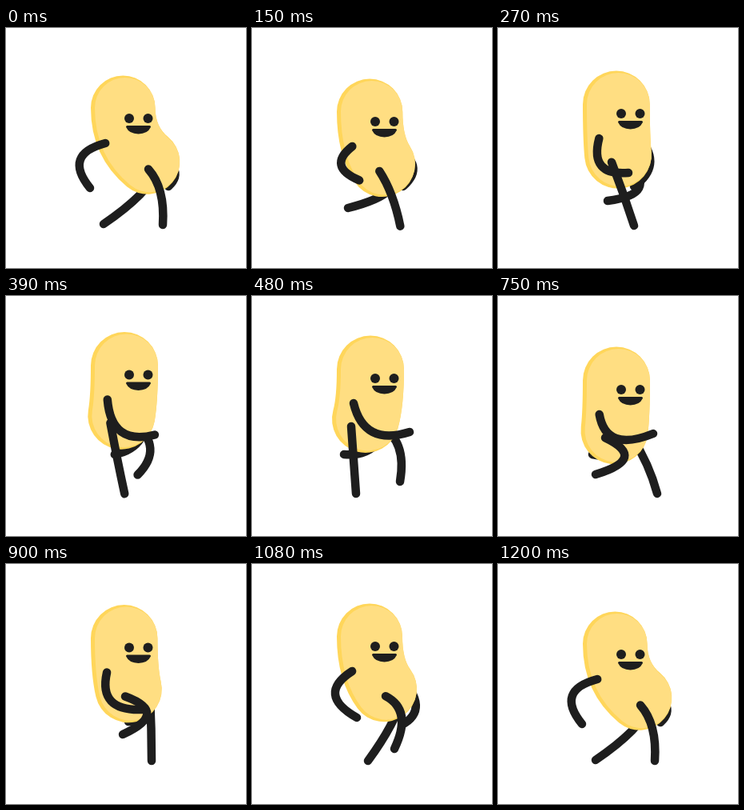
An HTML page with a canvas for the animation above (1.23 s loop, 300 px wide and 300 px high).

```html
<!DOCTYPE html>
<html>
<head>
<meta charset="utf-8">
<style>
html, body { margin: 0; width: 100%; height: 100%; overflow: hidden; background: #fff; }
canvas { display: block; width: 300px; height: 300px; }
</style>
</head>
<body>
<canvas id="stage" width="300" height="300"></canvas>
<script>
const ctx = document.getElementById('stage').getContext('2d');
const LOOP = 1230, STEP = 30, STRIDE = 1200;
const INK = '#1e1e1e', LIGHT = '#ffde82', SHADE = '#ffd65a';

// Each row: time, then the animated values.
const bobKeys = [[0, 113], [100, 118.3], [150, 117], [270, 107], [300, 104.5], [390, 98.5], [480, 103]];
const pelvisKeys = [[0, 177], [270, 150], [480, 142], [600, 141.5], [750, 145.5], [900, 153], [1080, 165]];

// time, hip x, knee x, knee y, foot x, foot y
const frontLegKeys = [
  [0, 178, 199, 200, 196, 246],
  [270, 142, 157, 207, 170, 247],
  [480, 124, 127, 204, 130, 247],
  [600, 122, 116, 209, 108, 245],
  [660, 125, 138, 208, 102, 238],
  [750, 134, 188, 203, 122, 223],
  [900, 149, 205, 186, 146, 213],
  [1080, 167, 201, 183, 178, 231]
];
const backLegKeys = [
  [0, 190, 178, 207, 122, 245],
  [150, 165, 198, 205, 120, 225],
  [270, 162, 203, 208, 137, 216],
  [480, 160, 194, 180, 185, 232],
  [600, 165, 193, 205, 203, 246],
  [750, 168, 189, 210, 199, 247],
  [900, 180, 182, 206, 182, 246],
  [1080, 188, 180, 198, 145, 246]
];

// time, elbow x, elbow y, hand x, hand y
const frontArmKeys = [
  [0, 71, 158, 105, 200],
  [270, 114, 185, 163, 181],
  [480, 140, 188, 197, 170],
  [750, 135, 196, 194, 172],
  [900, 115, 184, 170, 182],
  [1080, 80, 163, 131, 192]
];
const backArmKeys = [
  [0, 228, 176, 203, 198],
  [270, 206, 172, 170, 198],
  [480, 165, 203, 115, 198],
  [750, 165, 208, 118, 198],
  [900, 190, 195, 153, 197],
  [1080, 224, 177, 191, 199]
];

// Periodic cubic interpolation through uneven keys.
function sample(keys, time, period) {
  const n = keys.length;
  const t = time % period;
  const key = (i, c) => keys[(i + n) % n][c] + (c ? 0 : Math.floor(i / n) * period);
  let i = n - 1;
  while (keys[i][0] > t) i--;
  const span = key(i + 1, 0) - key(i, 0);
  const u = (t - key(i, 0)) / span;
  const slope = (j, c) => (key(j + 1, c) - key(j - 1, c)) / (key(j + 1, 0) - key(j - 1, 0));
  return keys[0].slice(1).map((_, k) => {
    const c = k + 1, a = key(i, c), b = key(i + 1, c);
    const ma = slope(i, c) * span, mb = slope(i + 1, c) * span;
    return a + u * (ma + u * (3 * (b - a) - 2 * ma - mb + u * (2 * (a - b) + ma + mb)));
  });
}

function curve(color, width, x0, y0, cx, cy, x1, y1) {
  ctx.strokeStyle = color;
  ctx.lineWidth = width;
  ctx.beginPath();
  ctx.moveTo(x0, y0);
  ctx.quadraticCurveTo(cx, cy, x1, y1);
  ctx.stroke();
}

const limb = (...points) => curve(INK, 10.5, ...points);

function drawFace(y) {
  ctx.fillStyle = ctx.strokeStyle = INK;
  for (const x of [154, 177.5]) {
    ctx.beginPath();
    ctx.arc(x, y, 6, 0, Math.PI * 2);
    ctx.fill();
  }
  ctx.lineWidth = 3;
  ctx.beginPath();
  ctx.moveTo(151.5, y + 10.5);
  ctx.lineTo(179.5, y + 10.5);
  ctx.bezierCurveTo(175, y + 20.5, 156, y + 20.5, 151.5, y + 10.5);
  ctx.closePath();
  ctx.fill();
  ctx.stroke();
}

function draw(t) {
  const [eyeY] = sample(bobKeys, t, STRIDE / 2);
  const [pelvisX] = sample(pelvisKeys, t, STRIDE);
  const [frontHip, ...frontLeg] = sample(frontLegKeys, t, STRIDE);
  const [backHip, ...backLeg] = sample(backLegKeys, t, STRIDE);
  const bend = pelvisX - 148;
  const radius = 42 - Math.max(0, bend) * 0.06;
  const headX = 106 + radius, headY = eyeY - 53.5 + radius;
  const pelvisY = eyeY + 51.5 + bend * 0.1;
  const hipY = pelvisY + 9;

  ctx.fillStyle = '#fff';
  ctx.fillRect(0, 0, 300, 300);
  ctx.lineCap = ctx.lineJoin = 'round';

  limb(178, eyeY + 32, ...sample(backArmKeys, t, STRIDE));
  limb(backHip, hipY, ...backLeg);

  const torso = (color, r, dx) =>
    curve(color, r * 2, headX + dx, headY, headX + dx, eyeY + 29, pelvisX + dx, pelvisY);
  torso(SHADE, radius, 0);
  torso(LIGHT, radius - 2.5, 2.5);
  drawFace(eyeY);

  limb(126.5 - bend * 0.08, eyeY + 31, ...sample(frontArmKeys, t, STRIDE));
  limb(frontHip, hipY, ...frontLeg);
}

const start = performance.now();
function tick() {
  const elapsed = (performance.now() - start) % LOOP;
  draw(Math.floor(elapsed / STEP) * STEP);
  requestAnimationFrame(tick);
}
tick();
</script>
</body>
</html>
```
